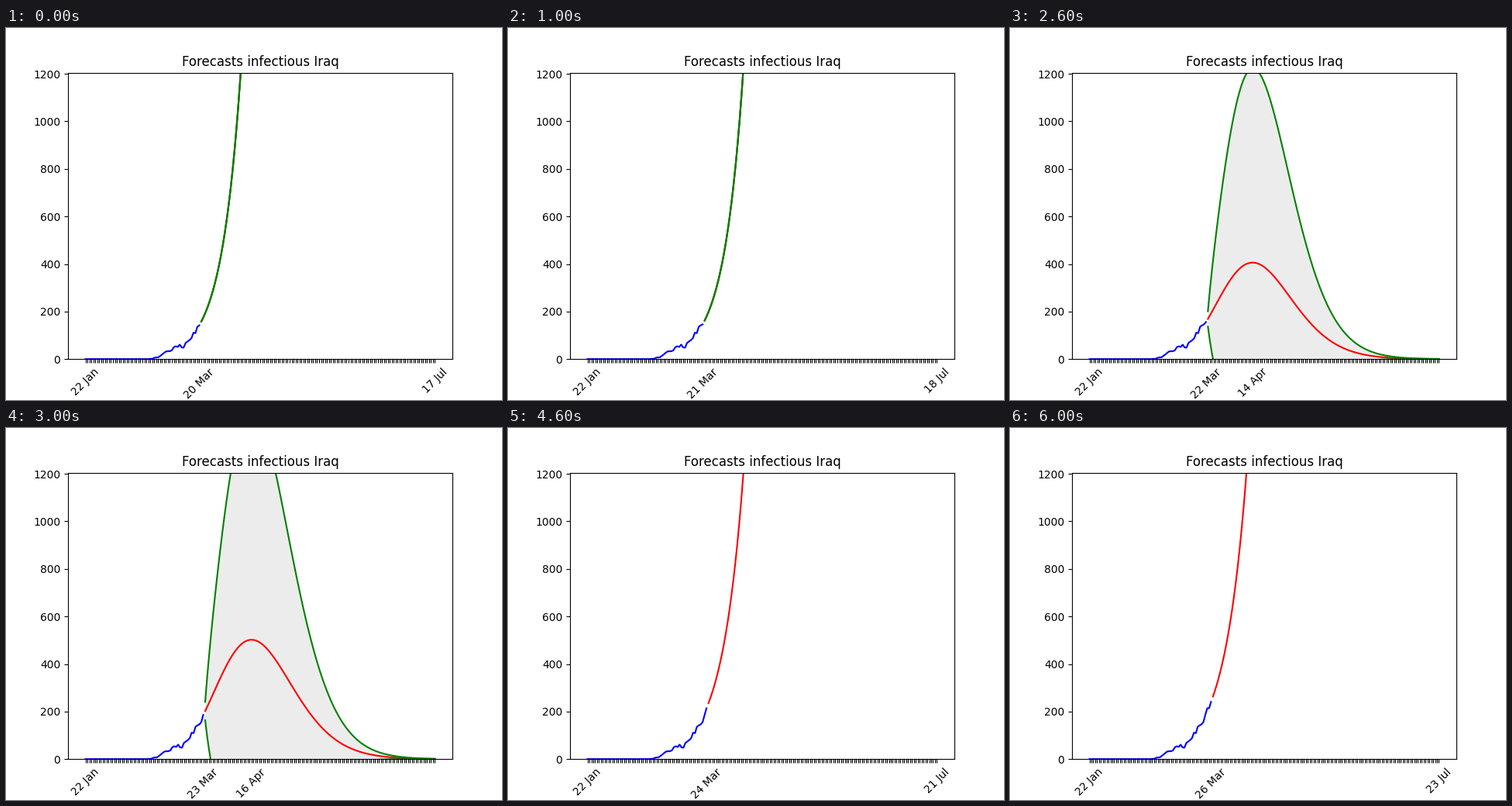
A matplotlib script for the animation above (7000 ms loop, 640x480 px).

```python
import numpy as np
import matplotlib.pyplot as plt
from matplotlib.animation import FuncAnimation

MONTHS = [("Jan", 31), ("Feb", 29), ("Mar", 31), ("Apr", 30),
          ("May", 31), ("Jun", 30), ("Jul", 31)]
FIRST_DAY = 22      # day 0 is 22 Jan
HORIZON = 120       # forecast length in days
BEND = 0.023        # decay of the infection rate per day

# Daily infectious counts: zeros until 24 Feb, then the outbreak.
CASES = np.array([0] * 33 + [
    1, 1, 5, 7, 7, 13, 19, 26, 32, 33, 33, 37, 50, 54, 51, 61,
    49, 48, 68, 74, 80, 88, 111, 109, 136, 142, 146, 156, 186, 214, 214, 241])

# One forecast per day: ("growth", first value, daily rate, has bounds)
# or ("wave", first value, peak value, days to peak, bound spread).
FORECASTS = [
    ("growth", 158, 0.1013, True),
    ("growth", 162, 0.1018, True),
    ("wave", 169, 406, 23, 1.03),
    ("wave", 202, 502, 24, 0.99),
    ("growth", 235, 0.0897, False),
    ("wave", 231, 597, 25, 1.00),
    ("growth", 263, 0.0862, False),
]


def date_label(index):
    day = FIRST_DAY + index
    for name, length in MONTHS:
        if day <= length:
            return f"{day} {name}"
        day -= length


def wave(t, start, peak, peak_day):
    """Epidemic wave whose growth rate fades until it peaks."""
    gain = np.exp(BEND * peak_day)
    recovery = np.log(peak / start) / ((gain - 1) / BEND - peak_day)
    infection = recovery * gain
    return start * np.exp(infection * (1 - np.exp(-BEND * t)) / BEND - recovery * t)


def relative_error(t, spread):
    return 0.19 + spread * (2.74 * t / (t + 6) - 0.0175 * t)


fig = plt.figure(figsize=(6.4, 4.8), dpi=100)


def draw(step):
    fig.clear()
    ax = fig.add_subplot()
    today = 58 + step
    t = np.arange(HORIZON)
    days = today + 1 + t
    last = days[-1]
    labels = {0: date_label(0), today: date_label(today)}

    kind, start, *params = FORECASTS[step]
    ax.plot(np.arange(today + 1), CASES[:today + 1], color="blue")
    if kind == "growth":
        rate, bounded = params
        mean = start * np.exp(rate * t)
        bounds = (mean, mean) if bounded else ()
        marked = last
    else:
        peak, peak_day, spread = params
        mean = wave(t, start, peak, peak_day)
        error = mean * relative_error(t, spread)
        bounds = (mean - error, mean + error)
        ax.fill_between(days, *bounds, color="#ececec", linewidth=0)
        marked = days[peak_day]
    # Forecast dates are counted from today, one position to the left.
    labels[marked] = date_label(marked - 1)

    ax.plot(days, mean, color="red")
    for bound in bounds:
        ax.plot(days, bound, color="green")

    ax.set_xticks(range(last + 1),
                  [labels.get(i, "") for i in range(last + 1)], rotation=45)
    ax.set_xlim(-0.05 * last, 1.05 * last)
    ax.set_ylim(0, 1205)
    ax.set_title("Forecasts infectious Iraq")
    return []


anim = FuncAnimation(fig, draw, frames=len(FORECASTS), init_func=lambda: [],
                     interval=1000, repeat=True, repeat_delay=0)
plt.show()
```
